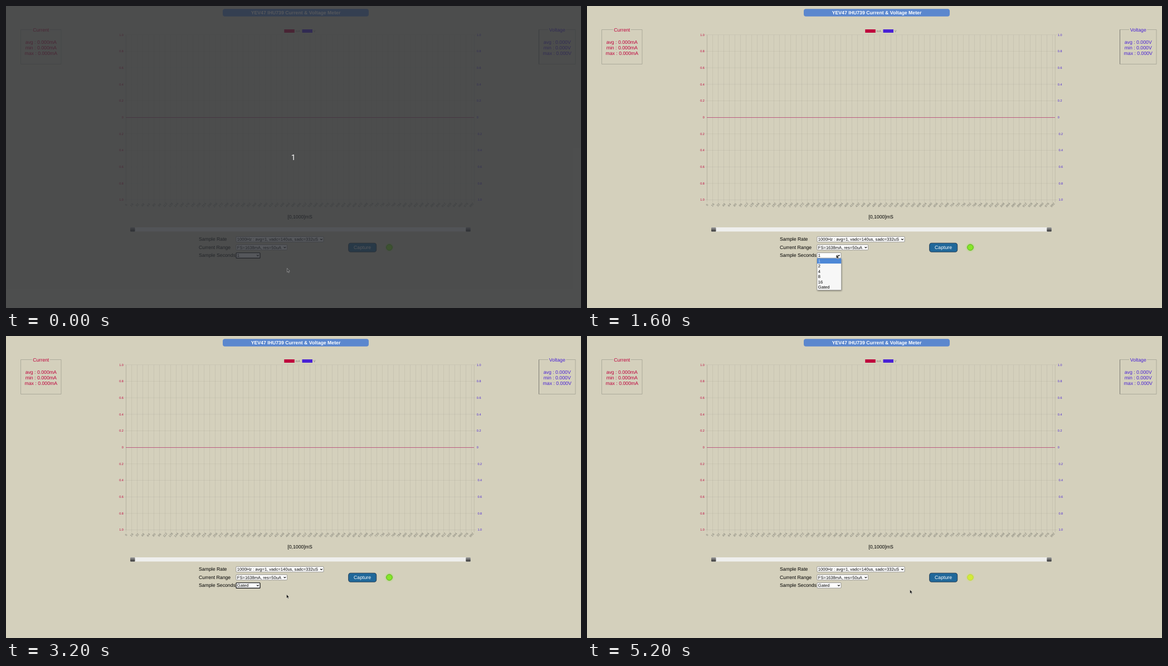
Write an HTML page that moves like this. It is 1032 px wide and 543 px high and loops after 8000 ms.

```html
<!DOCTYPE html>
<html lang="en">
<head>
<meta charset="utf-8">
<title>Current &amp; Voltage Meter</title>
<style>
html, body { margin: 0; width: 100%; height: 100%; overflow: hidden; background: #d4d0bc; }
svg { display: block; width: 1032px; height: 543px; }
text { font-family: "Liberation Sans", Arial, sans-serif; font-size: 8.73px; text-rendering: geometricPrecision; white-space: pre; }
.tick { font-size: 5.5px; }
.field { font-size: 7.58px; }
</style>
</head>
<body>
<svg id="stage" viewBox="0 0 1032 543">
  <defs>
    <linearGradient id="knob" x2="0" y2="1">
      <stop offset="0" stop-color="#a2a2a2"/><stop offset="1" stop-color="#303030"/>
    </linearGradient>
    <filter id="blur" x="-50%" y="-50%" width="200%" height="200%"><feGaussianBlur stdDeviation="1.5"/></filter>
  </defs>
</svg>
<script>
const stage = document.getElementById('stage');
const RED = '#bf003c', BLUE = '#4921d6', LOOP = 8000, STEP = 100;
const MENU_TOP = 453.7, ROW = 9.42;

function add(tag, attrs, parent = stage) {
  const el = document.createElementNS('http://www.w3.org/2000/svg', tag);
  for (const k in attrs) el.setAttribute(k, attrs[k]);
  parent.appendChild(el);
  return el;
}
const rect = (x, y, width, height, fill, more, parent) =>
  add('rect', { x, y, width, height, fill, ...more }, parent);
const line = (d, stroke, width = 1) =>
  add('path', { d, stroke, 'stroke-width': width, fill: 'none' });
function text(str, x, y, fill, more, parent) {
  const el = add('text', { x, y, fill, ...more }, parent);
  el.textContent = str;
  return el;
}
const mid = { 'text-anchor': 'middle' };

// Header
rect(389, 5.3, 262, 13.4, '#5b87ce', { rx: 4 });
text('YEV47 IHU739 Current & Voltage Meter', 520, 15, '#fff', { ...mid, 'font-weight': 'bold' });

// Readout boxes
function readout(name, unit, color, x, w, gap) {
  const c = x + w / 2, r = x + w;
  const frame = `M${c - gap} 42.5H${x}V104.5H${r}V42.5H${c + gap}`;
  line(frame, '#a3a194', .8);
  text(name, c, 46, color, mid);
  ['avg', 'min', 'max'].forEach((k, i) => text(`${k} : 0.000${unit}`, c, 68 + 10 * i, color, mid));
}
readout('Current', 'mA', RED, 26.5, 72.5, 16);
readout('Voltage', 'V', BLUE, 956.5, 65.5, 16);
line('M956.5 42.5V104.5', '#77766f', .9);

// Chart
function legend(x, label, color) {
  rect(x, 42, 18.5, 6, color);
  text(label, x + 20.3, 46.8, '#777', { class: 'tick' });
}
legend(499.3, 'mA', RED);
legend(531.5, 'V', BLUE);
for (let i = 0; i <= 62; i++) {
  const x = 215.5 + 10 * i;
  line(`M${x} 52V353`, 'rgba(0,0,0,.055)');
  text(16 * i, x, 359.5, '#77766e', { ...mid, class: 'tick', transform: `rotate(-50 ${x} 357.6)` });
}
line('M215.5 52V349M840.3 52V353', 'rgba(0,0,0,.09)');
for (let i = 0; i <= 10; i++) {
  const y = 51.7 + 29.69 * i, zero = i === 5;
  const label = zero ? '0' : Math.abs(1 - i / 5).toFixed(1);
  if (!zero) line(`M211.5 ${y}H844`, 'rgba(0,0,0,.055)');
  text(label, 210.8, y + 1.8, RED, { class: 'tick', 'text-anchor': 'end' });
  text(label, i > 5 ? 846.4 : 844.8, y + 1.8, BLUE, { class: 'tick' });
}
line('M215 200.5H840', '#b8507a', .9);
text('[0,1000]mS', 527.6, 382.3, '#000', mid);

// Range slider
rect(223, 398, 611, 7.5, '#efefed', { rx: 1 });
for (const x of [223, 825.3]) rect(x, 398, 8.5, 7.5, 'url(#knob)', { rx: 1 });

// Form
const rows = [['Sample Rate', 157, '1000Hz : avg=1, vadc=140us, sadc=332uS'],
  ['Current Range', 91.5, 'FS=1638mA, res=50uA'], ['Sample Seconds', 43, '1']];
const values = rows.map(([label, w, value], i) => {
  const y = 414.7 + 14.5 * i;
  text(label, 346, y + 7.7, '#000');
  rect(413, y, w, 9.5, '#fff', { stroke: '#777', 'stroke-width': .7, rx: 1 });
  line(`M${413 + w - 6} ${y + 3.9}l1.9 1.9l1.9 -1.9`, '#111', 1.1);
  return text(value, 414.8, y + 7.5, '#000', { class: 'field' });
});
const focus = rect(413, 443.8, 43, 9.6, 'none', { stroke: '#101010', 'stroke-width': 1.1, rx: 1 });

const button = rect(614.7, 426.2, 50, 16, '#20689a', { rx: 4, stroke: '#2c4459', 'stroke-width': 1.1 });
text('Capture', 639.6, 437.1, '#fff', mid);
const glow = add('circle', { cx: 688, cy: 434, r: 6.5, opacity: .6, filter: 'url(#blur)' });
const led = add('circle', { cx: 688, cy: 434, r: 5.3, 'stroke-width': .9 });

// Drop-down list
const menu = add('g', {});
rect(413.5, 455, 43.5, 57, 'rgba(0,0,0,.5)', { filter: 'url(#blur)' }, menu);
rect(413, MENU_TOP, 43.3, 57.1, '#f7f7f7', { stroke: '#9a9a9a', 'stroke-width': .6 }, menu);
const bar = rect(413, MENU_TOP, 43.3, ROW, '#4d87d6', {}, menu);
const options = ['1', '2', '4', '8', '16', 'Gated'].map((s, i) =>
  text(s, 414.8, 461 + ROW * i, '#000', { class: 'field' }, menu));

// Countdown veil
const veil = add('g', {});
rect(0, 0, 1032, 543, 'rgba(43,45,50,.8)', {}, veil);
text('1', 515.8, 276.6, '#fff', { ...mid, style: 'font: 14px Roboto, sans-serif' }, veil);

const pointer = add('path', { d: 'M0 0V7L1.6 5.6L2.7 8.1L3.8 7.6L2.8 5.2H4.8Z', 'stroke-width': .55 });

// Pointer moves: start and end in ms, then where to
const moves = [
  [600, 1000, 366, 429], [1000, 1300, 447.5, 447], [1900, 2000, 450, 451],
  [2000, 2500, 451, 502], [2900, 3200, 503.5, 464.5], [3200, 3700, 652, 438],
  [3700, 3900, 621, 436.5], [4600, 4900, 581, 455.5], [5000, 5200, 579.5, 456]
];
const ease = u => u * u * (3 - 2 * u);

function pointerAt(t) {
  let x = 504.5, y = 471.5;
  for (const [from, to, tx, ty] of moves) {
    const k = ease(Math.min(1, Math.max(0, (t - from) / (to - from))));
    x += (tx - x) * k;
    y += (ty - y) * k;
  }
  return [x, y];
}
const show = (el, on) => el.setAttribute('visibility', on ? 'visible' : 'hidden');

function draw(t) {
  const [x, y] = pointerAt(t);
  const pick = Math.min(5, Math.max(0, Math.floor((y - MENU_TOP) / ROW)));
  const open = t >= 1600 && t < 2900, busy = t >= 4400, counting = t < 500;
  show(veil, counting);
  show(menu, open);
  show(focus, !open && t < 4200);
  values[2].textContent = t < 2900 ? '1' : 'Gated';
  bar.setAttribute('y', MENU_TOP + ROW * pick);
  options.forEach((o, i) => o.setAttribute('fill', i === pick ? '#dce9fa' : '#000'));
  button.setAttribute('fill', t >= 4200 && !busy ? '#1b5c8a' : '#20689a');
  led.setAttribute('fill', busy ? '#d2ea3a' : '#86e629');
  led.setAttribute('stroke', busy ? '#b9d33a' : '#4fae14');
  glow.setAttribute('fill', busy ? '#d2e650' : '#86e629');
  pointer.setAttribute('transform', `translate(${x} ${y})`);
  pointer.setAttribute('fill', counting ? '#3c3d3f' : '#111');
  pointer.setAttribute('stroke', counting ? '#b8b8b8' : '#e8e6dc');
}

const start = performance.now();
function tick() {
  const t = (performance.now() - start) % LOOP;
  draw(Math.floor(t / STEP) * STEP);
  requestAnimationFrame(tick);
}
tick();
</script>
</body>
</html>
```
